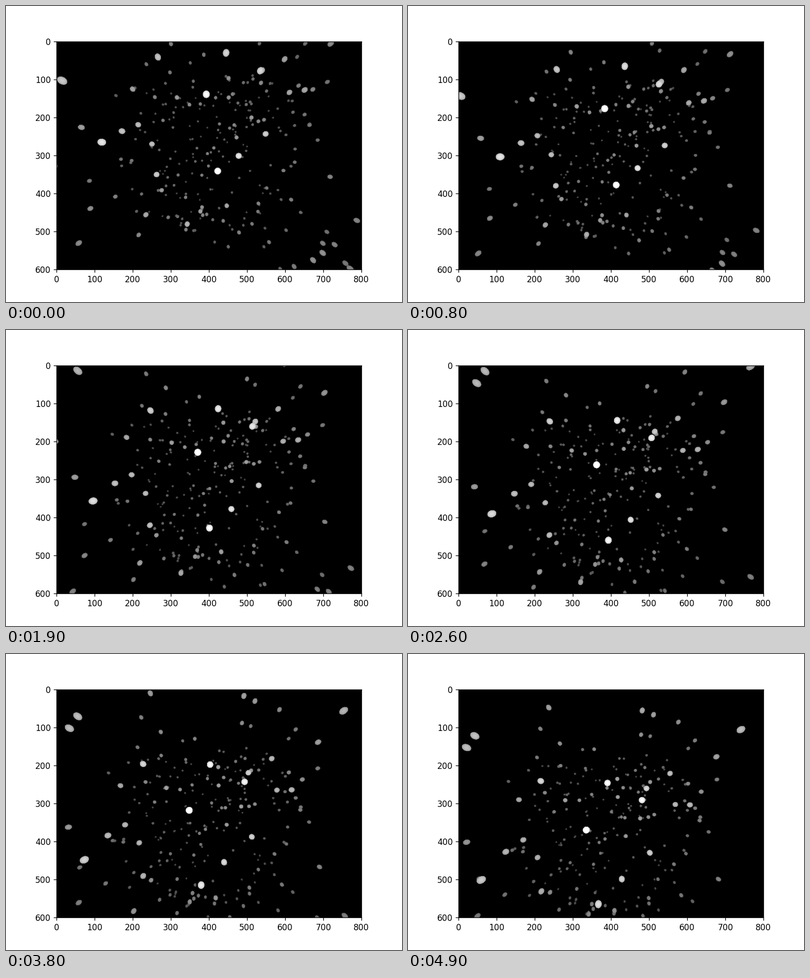
Recreate the animation shown at these times as a matplotlib script. Size 800x600 px, loop 5 s.

```python
import numpy as np
import matplotlib.pyplot as plt
from matplotlib.animation import FuncAnimation

WIDTH, HEIGHT, DPI = 800, 600, 120
FRAMES, INTERVAL = 50, 100
FOCAL = 400
RADIUS = 0.78
HALF_CUBE = 50
CLOUD_DEPTH = 80
STEP = np.array([-0.1, 0.4, 0.0])  # drift of the cloud per frame
BRIGHTNESS = 9450

# Brightest spheres: start position on screen and downward speed per frame
BRIGHTEST = [
    (393, 139, 4.71), (423, 341, 4.57), (119, 265, 4.82), (15, 103, 5.03),
    (445, 30, 4.41), (535, 77, 4.37), (478, 301, 4.04), (266, 41, 4.08),
    (172, 236, 3.90), (78, -74, 4.63), (100, -106, 4.65), (796, -115, 4.50),
]


def from_screen(x, y, speed):
    """Place a sphere in space; its screen speed gives its depth."""
    z = FOCAL * STEP[1] / speed
    return (x - WIDTH / 2) * z / FOCAL, (y - HEIGHT / 2) * z / FOCAL, z


def random_cloud(count=275, nearest=42):
    rng = np.random.default_rng(21)
    low = (-HALF_CUBE, -HALF_CUBE, nearest)
    high = (HALF_CUBE, HALF_CUBE, CLOUD_DEPTH + HALF_CUBE)
    return rng.uniform(low, high, (count, 3))


spheres = np.vstack([[from_screen(*star) for star in BRIGHTEST],
                     random_cloud()])
spheres = spheres[np.argsort(-np.linalg.norm(spheres, axis=1))]


def draw_sphere(image, center):
    """Cast a ray through each pixel near the sphere and shade the hits."""
    x, y, z = center
    u, v = FOCAL * x / z + WIDTH / 2, FOCAL * y / z + HEIGHT / 2
    distance = np.linalg.norm(center)
    reach = FOCAL * RADIUS * distance / z ** 2 + 2
    left, right = max(int(u - reach), 0), min(int(u + reach) + 1, WIDTH)
    top, bottom = max(int(v - reach), 0), min(int(v + reach) + 1, HEIGHT)
    if left >= right or top >= bottom:
        return
    px = np.arange(left, right)[None, :] + 0.5 - WIDTH / 2
    py = np.arange(top, bottom)[:, None] + 0.5 - HEIGHT / 2
    along = px * x + py * y + FOCAL * z
    length2 = px ** 2 + py ** 2 + FOCAL ** 2
    facing2 = 1 - (distance ** 2 - along ** 2 / length2) / RADIUS ** 2
    hit = facing2 >= 0
    shade = 0.7 + 0.3 * np.sqrt(facing2[hit])
    image[top:bottom, left:right][hit] = np.minimum(
        255, BRIGHTNESS / distance * shade)


def render(frame):
    image = np.zeros((HEIGHT, WIDTH))
    for center in spheres + frame * STEP:
        draw_sphere(image, center)
    return image


plt.rcParams["font.family"] = "DejaVu Sans"
fig, ax = plt.subplots(figsize=(WIDTH / DPI, HEIGHT / DPI), dpi=DPI)
ticks = {"xticks": range(0, WIDTH + 1, 100), "yticks": range(0, HEIGHT + 1, 100)}
picture = ax.imshow(render(0), cmap="gray", vmin=0, vmax=255,
                    extent=(0, WIDTH, HEIGHT, 0))
ax.set(**ticks)


def update(frame):
    picture.set_data(render(frame))
    return [picture]


animation = FuncAnimation(fig, update, frames=FRAMES, interval=INTERVAL,
                          repeat=True, repeat_delay=0)
plt.show()
```
